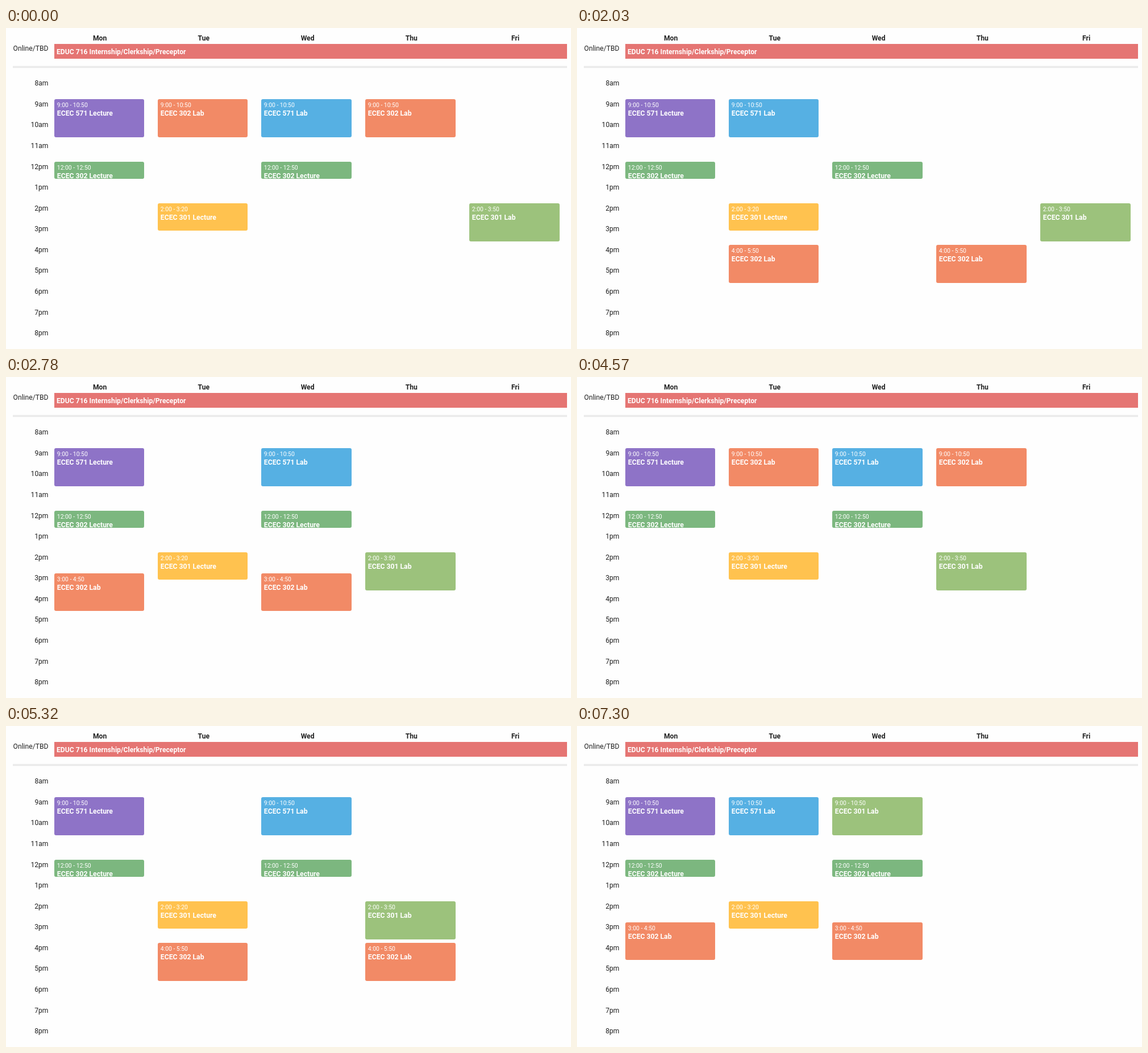
Write an HTML page that moves like this. It is 994 px wide and 564 px high and loops after 8000 ms.

```html
<!DOCTYPE html>
<html lang="en">
<head>
<meta charset="utf-8">
<title>Weekly schedule</title>
<style>
  html, body { margin: 0; width: 100%; height: 100%; overflow: hidden; background: #fefefe; }
  #stage { display: block; width: 994px; height: 564px; font: 12.15px Roboto, sans-serif; fill: #212121; }
  .bold { font-weight: 700; }
  .day { text-anchor: middle; }
  .hour { text-anchor: end; }
  .event text { fill: #fff; }
  .event .time { font-size: 10.4px; }
  .event .name { font-size: 12.2px; font-weight: 700; }

  /* Each alternative placement is switched on and off in hard steps. */
  .event { animation: 8s step-end infinite; }
  .blue-wed { animation-name: blue-wed; }
  .blue-tue { animation-name: blue-tue; }
  .lab-9 { animation-name: lab-9; }
  .lab-4 { animation-name: lab-4; }
  .lab-3 { animation-name: lab-3; }
  .fri { animation-name: fri; }
  .thu { animation-name: thu; }
  .wed { animation-name: wed; }
  @keyframes blue-wed {
    0%, 34.75%, 57.125% { visibility: visible; }
    25.375%, 47.875%, 80%, 100% { visibility: hidden; }
  }
  @keyframes blue-tue {
    0%, 34.75%, 57.125% { visibility: hidden; }
    25.375%, 47.875%, 80%, 100% { visibility: visible; }
  }
  @keyframes lab-9 {
    0%, 57.125% { visibility: visible; }
    13.125%, 66.5%, 100% { visibility: hidden; }
  }
  @keyframes lab-4 {
    0%, 34.75%, 91.25%, 100% { visibility: hidden; }
    13.125%, 66.5% { visibility: visible; }
  }
  @keyframes lab-3 {
    0%, 57.125% { visibility: hidden; }
    34.75%, 91.25%, 100% { visibility: visible; }
  }
  @keyframes fri {
    0% { visibility: visible; }
    34.75%, 100% { visibility: hidden; }
  }
  @keyframes thu {
    0%, 91.25%, 100% { visibility: hidden; }
    34.75% { visibility: visible; }
  }
  @keyframes wed {
    0% { visibility: hidden; }
    91.25%, 100% { visibility: visible; }
  }
</style>
</head>
<body>
<svg id="stage" viewBox="0 0 994 564">
  <text x="74.5" y="39.6" class="hour">Online/TBD</text>
  <rect x="85" y="28" width="902" height="26" fill="#e57573"/>
  <text x="89" y="45.5" class="bold" fill="#fff">EDUC 716 Internship/Clerkship/Preceptor</text>
  <path d="M12 67.5H987M12 69.5H987" stroke="#dcdcdc"/>
</svg>
<script>
  const stage = document.getElementById('stage');
  const lefts = [85, 267, 449, 632, 815];
  const rights = [243, 425, 608, 791, 974];
  const hourHeight = 36.6;

  function add(parent, tag, attrs, text = '') {
    const node = document.createElementNS('http://www.w3.org/2000/svg', tag);
    for (const key in attrs) node.setAttribute(key, attrs[key]);
    node.textContent = text;
    return parent.appendChild(node);
  }

  function clock(minutes) {
    const hour = Math.floor(minutes / 60);
    return `${(hour + 11) % 12 + 1}:${String(minutes % 60).padStart(2, '0')}`;
  }

  function addEvent(day, hour, minutes, name, color, variant = '') {
    const y = 125 + hourHeight * (hour - 9);
    const top = Math.round(y);
    const height = Math.round(y + hourHeight * minutes / 60 - 0.5) - top;
    const width = rights[day] - lefts[day];
    const box = add(stage, 'svg', { x: lefts[day], y: top, width, height, class: `event ${variant}` });
    add(box, 'rect', { width, height, rx: 3, fill: color });
    add(box, 'text', { x: 4.8, y: 13.7, class: 'time' }, `${clock(hour * 60)} - ${clock(hour * 60 + minutes)}`);
    add(box, 'text', { x: 4.8, y: 29.1, class: 'name' }, name);
  }

  ['Mon', 'Tue', 'Wed', 'Thu', 'Fri'].forEach((day, i) =>
    add(stage, 'text', { x: 165.1 + 182.75 * i, y: 22.2, class: 'day bold' }, day));

  for (let hour = 8; hour <= 20; hour++) {
    add(stage, 'text', { x: 74.5, y: 101.2 + 36.58 * (hour - 8), class: 'hour' },
      `${(hour + 11) % 12 + 1}${hour < 12 ? 'am' : 'pm'}`);
  }

  const orange = '#f28a66', blue = '#56b0e3', green = '#7cb77f', lime = '#9cc27c';

  addEvent(0, 9, 110, 'ECEC 571 Lecture', '#8e73c7');
  for (const day of [0, 2]) addEvent(day, 12, 50, 'ECEC 302 Lecture', green);
  addEvent(1, 14, 80, 'ECEC 301 Lecture', '#ffc24f');

  addEvent(2, 9, 110, 'ECEC 571 Lab', blue, 'blue-wed');
  addEvent(1, 9, 110, 'ECEC 571 Lab', blue, 'blue-tue');

  for (const day of [1, 3]) {
    addEvent(day, 9, 110, 'ECEC 302 Lab', orange, 'lab-9');
    addEvent(day, 16, 110, 'ECEC 302 Lab', orange, 'lab-4');
  }
  for (const day of [0, 2]) addEvent(day, 15, 110, 'ECEC 302 Lab', orange, 'lab-3');

  addEvent(4, 14, 110, 'ECEC 301 Lab', lime, 'fri');
  addEvent(3, 14, 110, 'ECEC 301 Lab', lime, 'thu');
  addEvent(2, 9, 110, 'ECEC 301 Lab', lime, 'wed');
</script>
</body>
</html>
```
